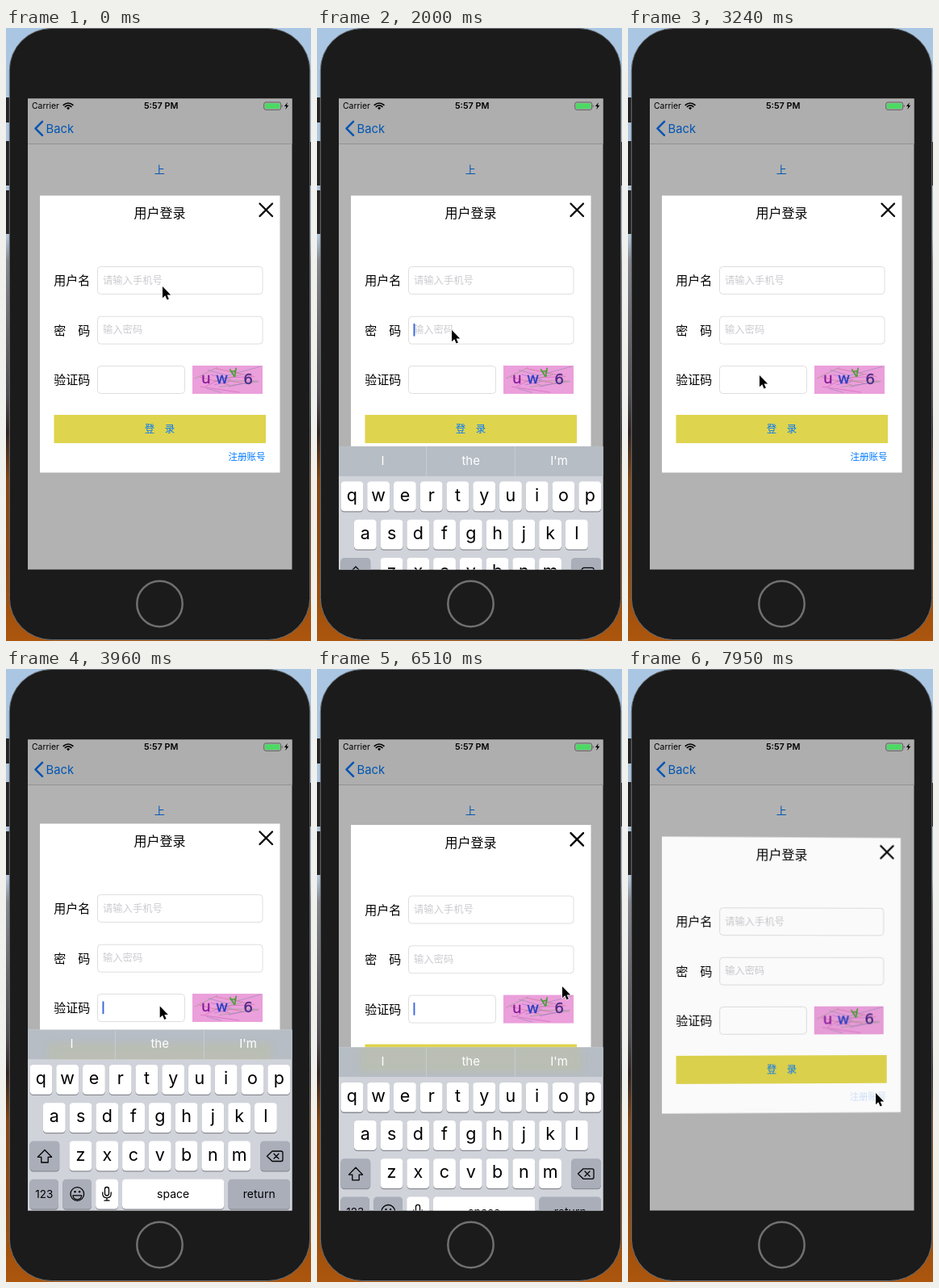
These frames come from a looping animation (378x759 px, 8 s). An HTML page:

```html
<!DOCTYPE html>
<html lang="zh-CN">
<head>
<meta charset="utf-8">
<title>登录弹窗</title>
<style>
html, body { margin: 0; width: 100%; height: 100%; overflow: hidden; background: #1b1b1b; }
body { position: relative; }
.layer { position: absolute; left: 0; top: 0; width: 100%; height: 100%; display: block; }
text { font-family: Inter, "Noto Sans CJK SC", "Noto Sans CJK", sans-serif; }
.mid { text-anchor: middle; }
.link { fill: #0055b2; }
.blue { fill: #007aff; }
.hint { fill: #cbcbd0; font-size: 12.3px; }
.label { font-size: 15px; }
.field { fill: #fff; stroke: #dedede; }
.code { font-family: "DejaVu Sans", sans-serif; }
.line { fill: none; stroke: #000; stroke-linecap: round; stroke-linejoin: round; }
#dialog { transform-origin: 190.75px 379px; }
</style>
</head>
<body>
<svg class="layer" viewBox="0 0 378 759">
  <defs>
    <linearGradient id="desk" x1="0" y1="0" x2="0" y2="1">
      <stop offset="0" stop-color="#a9c6e3"/>
      <stop offset=".34" stop-color="#b3c5d8"/>
      <stop offset=".38" stop-color="#85878d"/>
      <stop offset=".6" stop-color="#4f4b50"/>
      <stop offset=".66" stop-color="#2e2220"/>
      <stop offset=".74" stop-color="#854512"/>
      <stop offset=".88" stop-color="#954a0c"/>
      <stop offset="1" stop-color="#ac560e"/>
    </linearGradient>
  </defs>
  <rect width="378" height="759" fill="url(#desk)"/>
  <g fill="#222">
    <rect x="-2" y="86" width="7" height="31"/>
    <rect x="-2" y="140" width="7" height="55"/>
    <rect x="-2" y="201" width="7" height="54"/>
    <rect x="375" y="141" width="5" height="54"/>
  </g>
  <rect x="4.3" y=".5" width="372.4" height="757" rx="52" fill="#1b1b1b" stroke="#6b7076"/>
  <circle cx="190.5" cy="713" r="28.2" fill="none" stroke="#707070" stroke-width="2.5"/>
  <rect x="27" y="87.5" width="327.5" height="583" fill="#b2b2b2"/>
  <rect x="27" y="87.5" width="327.5" height="56" fill="#aeaeae"/>
  <rect x="27" y="143" width="327.5" height="1" fill="#929292"/>

  <text x="32" y="100.3" font-size="10.4">Carrier</text>
  <path class="line" stroke-width="1.7" stroke-linecap="butt" d="M71.3 95.4a8.2 8.2 0 0 1 11.6 0M73.3 97.5a5.4 5.4 0 0 1 7.6 0"/>
  <path d="M77.1 101.2l-2.1-2.2a3 3 0 0 1 4.2 0z"/>
  <text class="mid" x="192.2" y="100.4" font-size="10.8" font-weight="600">5:57 PM</text>
  <rect x="319.7" y="91.9" width="21" height="9.4" rx="2.4" fill="none" stroke="#555" stroke-width=".9"/>
  <rect x="321" y="93.2" width="18.4" height="6.8" rx="1.2" fill="#4cd964"/>
  <path d="M341.8 95v3.2a1.8 1.8 0 0 0 0-3.2z" fill="#555"/>
  <path d="M348.9 92l-4 5h2.4l-1 4 4-5.2h-2.5z"/>

  <path class="line" style="stroke:#0055b2" stroke-width="2.6" stroke-linecap="butt" stroke-linejoin="miter" d="M45 115.8l-8.5 8.5 8.5 8.5"/>
  <text class="link" x="49.5" y="129.7" font-size="14.8">Back</text>
  <text class="link mid" x="190.3" y="180" font-size="13">上</text>
  <text class="link mid" x="190.8" y="546" font-size="13.2">时间选择</text>
</svg>

<svg class="layer" id="dialog" viewBox="0 0 378 759">
  <rect x="42" y="207.5" width="297.5" height="343" fill="#fff"/>
  <text class="mid" x="190.5" y="235.3" font-size="16">用户登录</text>
  <path class="line" stroke-width="2.3" d="M314.5 217.5l15.5 15.5m0-15.5l-15.5 15.5"/>
  <text class="label" x="59.3" y="318.2">用户名</text>
  <text class="label" x="59.3" y="379.8">密　码</text>
  <text class="label" x="59.3" y="441">验证码</text>
  <rect class="field" x="113.5" y="295.5" width="204.5" height="34" rx="4"/>
  <rect class="field" x="113.5" y="357.2" width="204.5" height="34" rx="4"/>
  <rect class="field" x="113.5" y="418.5" width="108" height="34" rx="4"/>
  <text class="hint" x="120" y="316.8">请输入手机号</text>
  <text class="hint" x="120" y="378.4">输入密码</text>
  <rect id="caret" x="119.5" width="1.9" height="15.6" fill="#3a66de"/>
  <rect x="231" y="418" width="87" height="35" fill="#eb9fdb"/>
  <g id="scratches" fill="none" stroke-width=".6" opacity=".65"></g>
  <g font-size="18.5" stroke-width=".3">
    <text class="code" x="242" y="440" fill="#8a1a9c" stroke="#8a1a9c">u</text>
    <text class="code" x="260" y="440" fill="#2b3fc4" stroke="#2b3fc4">w</text>
    <text class="code" x="277.5" y="432" font-size="14" fill="#3fa02c" stroke="#3fa02c" transform="rotate(-12 282 427)">∀</text>
    <text class="code" x="294.3" y="440.5" fill="#4a2c86" stroke="#4a2c86">6</text>
  </g>
  <rect x="59.5" y="479" width="262.5" height="35" fill="#dfd44d"/>
  <text class="blue mid" x="190.5" y="501.2" font-size="12.5">登　录</text>
  <text class="blue" id="signup" x="275.5" y="534.8" font-size="11.5">注册账号</text>
  <rect id="shade" x="42" y="207.5" width="297.5" height="343" opacity="0"/>
</svg>

<svg class="layer" viewBox="0 0 378 759">
  <defs><filter id="soft" x="-10%" y="-40%" width="120%" height="180%"><feGaussianBlur stdDeviation="4"/></filter></defs>
  <svg x="27" y="87.5" width="327.5" height="583" viewBox="27 87.5 327.5 583">
    <g id="keyboard">
      <rect x="27" y="0" width="328" height="226" fill="#d0d3da"/>
      <svg x="27" y="0" width="328" height="37" viewBox="27 0 328 37">
        <rect x="27" width="328" height="37" fill="#b6bdc5"/>
        <rect id="glow" x="52" width="277" height="35" fill="#d0c860" opacity=".16" filter="url(#soft)"/>
        <path d="M135.5 0v37M245.5 0v37" stroke="#c6ccd3"/>
        <g class="mid" fill="#fff" font-size="15">
          <text x="81.5" y="22.8">I</text><text x="190.7" y="22.8">the</text><text x="300" y="22.8">I'm</text>
        </g>
      </svg>
      <g id="keys"></g>
      <path class="line" stroke-width="1.3" d="M48 149l8.6 8.8h-4.4v6.7h-8.4v-6.7h-4.4z"/>
      <path class="line" stroke-width="1.3" d="M330 150.5h11q2 0 2 2v8.5q0 2-2 2h-11l-6.5-6.25zM332 153.7l6 6m0-6l-6 6"/>
      <circle class="line" cx="88.3" cy="203.5" r="8.3" stroke-width="1.3"/>
      <path class="line" stroke-width="1.2" d="M82.8 205.3h11q-.8 5-5.5 5t-5.5-5z"/>
      <circle cx="85.5" cy="200.8" r="1.2"/><circle cx="91.1" cy="200.8" r="1.2"/>
      <rect class="line" x="122.5" y="195" width="5" height="10.5" rx="2.5" stroke-width="1.3"/>
      <path class="line" stroke-width="1.3" d="M119.8 201.5v1.8q0 5 5.2 5t5.2-5v-1.8M125 208.3v3.4M122 211.7h6"/>
    </g>
  </svg>
  <path id="pointer" d="M0 0V14.3L3.3 11.3 5.6 16.6 7.9 15.6 5.6 10.5H10.2Z" stroke="#fff" stroke-width="1.3" paint-order="stroke" stroke-linejoin="round"/>
</svg>

<script>
const LOOP = 8000;
const $ = id => document.getElementById(id);

// Bursts of motion: start, end, pictures; the view rests in between.
const bursts = [
  [300, 1000, 13], [1120, 1590, 9], [1880, 2650, 14], [2710, 3240, 10], [3540, 4260, 13],
  [4380, 4730, 7], [5090, 5860, 14], [6330, 7080, 14], [7140, 7660, 10], [7840, 7950, 3]
];

// Keyboard visits: focused field, rise time, fall time.
const visits = [
  { field: 0, up: 335, down: 1115 },
  { field: 1, up: 1881, down: 2700 },
  { field: 2, up: 3540, down: 5189 },
  { field: 2, up: 6308, down: 7015 }
];
const caretY = [304.3, 366, 427.5];

const route = [
  [300, 194, 320], [650, 263, 310], [1000, 285, 273], [1120, 285, 273], [1530, 167, 374],
  [2000, 167, 374], [2590, 208, 269], [2650, 208, 275], [2710, 208, 280], [3200, 163, 430],
  [3700, 163, 430], [4260, 225, 402], [4380, 225, 402], [4610, 321, 367], [4730, 320, 380],
  [5270, 320, 380], [5860, 208, 433], [6330, 208, 433], [6505, 304, 393], [6900, 327, 394],
  [7080, 327, 394], [7600, 307, 525]
];

function stepped(t) {
  let held = 0;
  for (const [start, end, count] of bursts) {
    if (t < start) break;
    const gap = (end - start) / (count - 1);
    held = Math.min(end, start + Math.floor((t - start) / gap + .01) * gap);
  }
  return held;
}

// Critically damped spring
function spring(ms) {
  const x = Math.max(0, ms) * .02;
  return 1 - (1 + x) * Math.exp(-x);
}

function pointerAt(t) {
  const i = route.findIndex(p => p[0] > t);
  if (i === 0) return route[0].slice(1);
  if (i < 0) return route[route.length - 1].slice(1);
  const [a, b] = [route[i - 1], route[i]];
  const k = (t - a[0]) / (b[0] - a[0]);
  const e = k * k * (3 - 2 * k);
  return [a[1] + (b[1] - a[1]) * e, a[2] + (b[2] - a[2]) * e];
}

function key(x, y, w, label, size, dark) {
  return `<rect x="${x}" y="${y + 1}" width="${w}" height="37" rx="4.2" fill="#898c92"/>` +
    `<rect x="${x}" y="${y}" width="${w}" height="36.7" rx="4.2" fill="${dark ? '#a9aeb9' : '#fff'}"/>` +
    `<text class="mid" x="${x + w / 2}" y="${y + (size > 20 ? 24.2 : 23.3)}" font-size="${size}">${label}</text>`;
}

function buildKeys() {
  const rows = [['qwertyuiop', 29.5], ['asdfghjkl', 45.9], ['zxcvbnm', 78.6]];
  let out = '';
  rows.forEach(([letters, left], r) => [...letters].forEach((c, i) => {
    out += key(left + i * 32.76, 43.6 + r * 47.2, 27.8, c, 21.5);
  }));
  out += key(29.5, 138, 36.7, '', 14, true) + key(315.3, 138, 36.7, '', 14, true);
  out += key(29.5, 185.2, 35.5, '123', 13.5, true) + key(70.3, 185.2, 35.7, '', 14, true);
  out += key(111.2, 185.2, 27.8, '', 14) + key(144, 185.2, 126.3, 'space', 14);
  out += key(275.5, 185.2, 76.5, 'return', 14, true);
  $('keys').innerHTML = out;
}

function buildScratches() {
  let seed = 11;
  const rnd = () => (seed = seed * 16807 % 2147483647) / 2147483647;
  const inks = ['#5a9a50', '#c23fa8', '#7a55c8', '#b0566c', '#5f7fa0'];
  let out = '';
  for (let i = 0; i < 16; i++) {
    const x = 234 + rnd() * 42, y = 421 + rnd() * 29;
    const dx = 18 + rnd() * 32, dy = (rnd() - .5) * 30;
    const endY = Math.max(419, Math.min(452, y + dy));
    out += `<path d="M${x} ${y}L${Math.min(316, x + dx)} ${endY}" stroke="${inks[i % 5]}"/>`;
  }
  $('scratches').innerHTML = out;
}

function draw(time) {
  const t = stepped(time);
  const visit = visits.filter(v => v.up <= t).pop();
  const open = visit ? spring(t - visit.up) - spring(t - visit.down) : 0;
  const lift = visit && visit.field === 2 ? 16 * open : 0;
  const top = 671 - 225 * open;

  $('keyboard').setAttribute('transform', `translate(0 ${top})`);
  $('keyboard').style.display = open > .002 ? '' : 'none';
  $('glow').setAttribute('y', 479 - lift - top);

  const blink = t >= 4380 && t < 4700;
  const focused = visit && t < visit.down && !blink;
  $('caret').style.display = focused ? '' : 'none';
  if (focused) $('caret').setAttribute('y', caretY[visit.field]);

  const turn = Math.max(0, (t - 7840) / 110) ** 2;
  $('dialog').style.transform = turn > 0
    ? `perspective(500px) translateZ(${-2.65 * turn}px) rotateY(${1.02 * turn}deg)`
    : `translateY(${-lift}px)`;
  $('shade').setAttribute('opacity', .02 * turn);
  $('signup').style.fill = t >= 7840 ? '#cfe1fb' : '';

  const [x, y] = pointerAt(t);
  $('pointer').setAttribute('transform', `translate(${x} ${y})`);
}

buildKeys();
buildScratches();
const began = performance.now();
function tick() {
  draw((performance.now() - began) % LOOP);
  requestAnimationFrame(tick);
}
tick();
</script>
</body>
</html>
```
